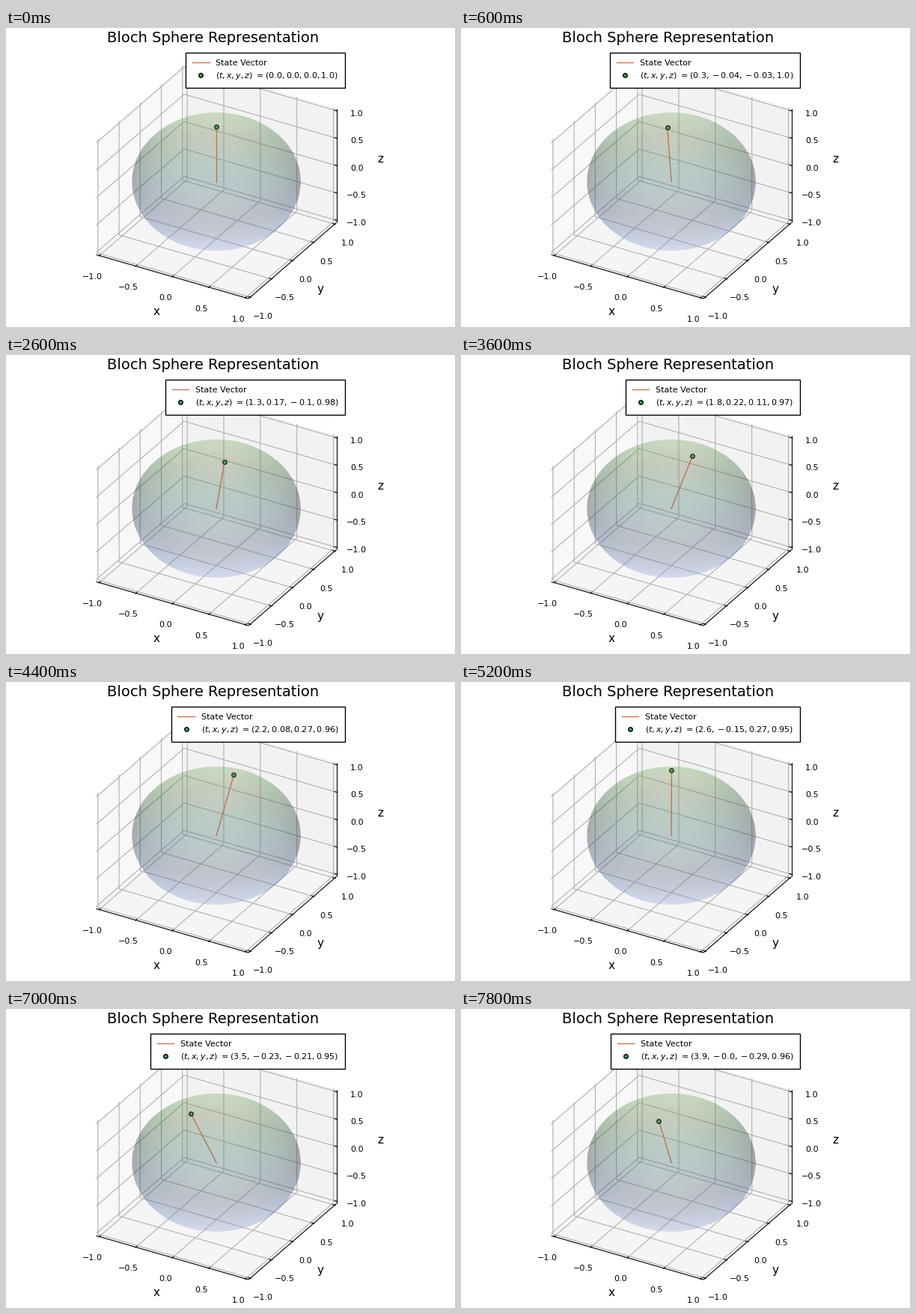
A matplotlib script for the animation above (8 s loop, 600x400 px).

```python
import numpy as np
import matplotlib.pyplot as plt
from matplotlib.animation import FuncAnimation
from matplotlib.collections import LineCollection, PolyCollection
from matplotlib.colors import LinearSegmentedColormap

W, H, DPI = 600, 400, 100
CENTER = np.array([281.1, 205.5])
SCALE = 197.4
BOX = np.array([0.57144, 0.57144, 0.42858])
EDGE = 1 + 1 / 24
TICKS = np.arange(-1, 1.01, 0.5)
ORANGE, GREEN, GRID = "#e36f47", "#3da44d", "#b0b0b0"

plt.rcParams["font.family"] = "DejaVu Sans"

# Orthographic camera: elevation 30, azimuth -60 degrees
elev, azim = np.radians([30, -60])
TO_EYE = np.array([np.cos(elev) * np.cos(azim),
                   np.cos(elev) * np.sin(azim), np.sin(elev)])
RIGHT = np.array([-np.sin(azim), np.cos(azim), 0])
UP = np.cross(TO_EYE, RIGHT)


def project(points):
    p = np.asarray(points, float) * BOX
    return CENTER + SCALE * np.stack([p @ RIGHT, -(p @ UP)], axis=-1)


fig = plt.figure(figsize=(W / DPI, H / DPI), dpi=DPI, facecolor="white")
ax = fig.add_axes([0, 0, 1, 1])
ax.set_xlim(0, W)
ax.set_ylim(H, 0)
ax.axis("off")


def label(x, y, text, size=8):
    ax.text(x, y, text, size=size, ha="center", va="baseline", zorder=1)


def draw_box():
    e = EDGE
    panes = [
        ([(-e, -e, -e), (-e, e, -e), (-e, e, e), (-e, -e, e)], 0.95),
        ([(-e, e, -e), (e, e, -e), (e, e, e), (-e, e, e)], 0.90),
        ([(-e, -e, -e), (e, -e, -e), (e, e, -e), (-e, e, -e)], 0.925),
    ]
    for corners, grey in panes:
        ax.add_collection(PolyCollection([project(corners)], facecolor=[[grey] * 3],
                                         alpha=0.5, linewidth=0, zorder=0))

    grid, marks = [], []
    inner, outer = 0.0333, 0.0167
    for t in TICKS:
        grid += [[(t, -e, -e), (t, e, -e), (t, e, e)],
                 [(e, t, -e), (-e, t, -e), (-e, t, e)],
                 [(e, e, t), (-e, e, t), (-e, -e, t)]]
        marks += [[(t, -e + inner, -e), (t, -e - outer, -e)],
                  [(e - inner, t, -e), (e + outer, t, -e)],
                  [(e - inner, e, t), (e + outer, e, t)]]
        text = f"{t:.1f}".replace("-", "\u2212")
        spots = [((t, -e, -e), (-9.7, 31.7)), ((e, t, -e), (17.3, 28.8)),
                 ((e, e, t), (27, 6.8))]
        for point, offset in spots:
            label(*(project(point) + offset), text)

    spines = [[(-e, -e, -e), (e, -e, -e)], [(e, -e, -e), (e, e, -e)],
              [(e, e, -e), (e, e, e)]]
    for lines, color, order in [(grid, GRID, 0.5), (spines + marks, "black", 0.8)]:
        ax.add_collection(LineCollection([project(s) for s in lines], colors=color,
                                         linewidths=0.8, zorder=order))


def draw_sphere(n=50):
    shades = ["#ded9ff", "#9faee1", "#5f7fbd", "#35517e", "#1a2a41",
              "#0f1f1b", "#1d4127", "#3a7140", "#69a859", "#dbe69b"]
    cmap = LinearSegmentedColormap.from_list("shell", shades)
    lon, lat = np.meshgrid(np.linspace(0, 2 * np.pi, n), np.linspace(0, np.pi, n))
    p = np.stack([np.cos(lon) * np.sin(lat), np.sin(lon) * np.sin(lat),
                  np.cos(lat)], axis=-1)
    quads = np.stack([p[:-1, :-1], p[1:, :-1], p[1:, 1:], p[:-1, 1:]], axis=2)
    quads = quads.reshape(-1, 4, 3)
    mid = quads.mean(axis=1)
    front = (mid / BOX) @ TO_EYE > 0
    for mask, order in [(~front, 4), (front, 4.1)]:
        ax.add_collection(PolyCollection(project(quads[mask]), alpha=0.2, linewidth=0,
                                         facecolors=cmap((mid[mask, 2] + 1) / 2),
                                         zorder=order))


def state(t):
    """Bloch vector: slow nutation on top of a fast precession."""
    r = 0.317 * np.sin(0.507 * t)
    phi = np.radians(115.45 * t - 180.7)
    return r * np.cos(phi) + 0.0, r * np.sin(phi) + 0.0, np.sqrt(1 - r * r)


draw_box()
draw_sphere()
label(276.3, 19.3, "Bloch Sphere Representation", 14)
label(201.3, 384, "x", 11)
label(420.3, 354.2, "y", 11)
label(500.2, 180.3, "z", 11)

# Both lie beneath the translucent shell
vector, = ax.plot([], [], color=ORANGE, lw=1, zorder=2)
tip, = ax.plot([], [], "o", ms=4, mfc=GREEN, mec="black", mew=1, zorder=3)


def update(i):
    t = i / 10
    v = state(t)
    path = project([(0, 0, 0), v])
    vector.set_data(path[:, 0], path[:, 1])
    tip.set_data(path[1:, 0], path[1:, 1])
    values = ",".join(str(round(float(c), 2)) for c in (t, *v))
    legend = ax.legend([vector, tip],
                       ["State Vector", f"$(t,x,y,z)$ $=({values})$"],
                       loc="upper right", bbox_to_anchor=(453.4, 32.8),
                       bbox_transform=ax.transData, borderaxespad=0, borderpad=0.8,
                       fontsize=8, fancybox=False, edgecolor="black", framealpha=1)
    legend.get_frame().set_linewidth(1)
    legend.set_zorder(6)
    return vector, tip, legend


anim = FuncAnimation(fig, update, frames=40, interval=200, repeat=True,
                     repeat_delay=0, blit=False)
plt.show()
```
